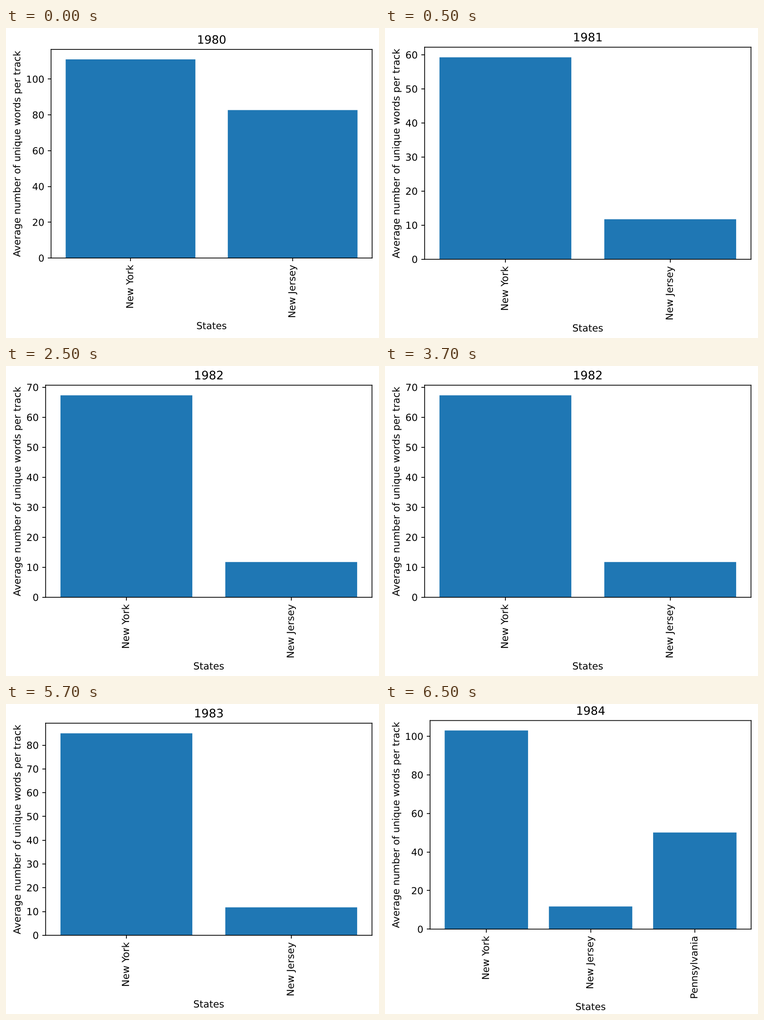
Write a matplotlib script that moves like this. It is 821 by 682 pixels and loops after 8 s.

```python
import matplotlib.pyplot as plt
from matplotlib.animation import FuncAnimation
from matplotlib.patheffects import Normal

WIDTH, HEIGHT, DPI = 821, 682, 100
AXES_INCHES = 4.65, 3.02
PAD_INCHES = 0.1
MEASURE_SCALE = 4
STEP_MS, FRAMES = 500, 16
FIRST_YEAR = 1980

# mean word counts per year; a state without a count is not shown
WORDS = {
    "New York": [111, 59.28, 67.33, 85, 103],
    "New Jersey": [82.67] + [11.75] * 4,
    "Pennsylvania": [0] * 4 + [50.1],
}

fig = plt.figure(figsize=(WIDTH / DPI, HEIGHT / DPI), dpi=DPI, facecolor="white")


def set_style(scale):
    """Scale the default text, line and tick sizes together."""
    plt.rcParams.update({
        "font.family": "DejaVu Sans",
        "font.size": 10 * scale,
        "axes.linewidth": 0.8 * scale,
        "axes.titlepad": 6 * scale,
        "axes.labelpad": 4 * scale,
        "text.hinting": "none",
        "path.snap": False,
        "path.effects": [Normal()],  # outlines keep text at fractional pixels
    })
    for axis in ("xtick", "ytick"):
        plt.rcParams.update({
            f"{axis}.major.size": 3.5 * scale,
            f"{axis}.major.width": 0.8 * scale,
            f"{axis}.major.pad": 3.5 * scale,
        })


def build_chart(index, scale, left=0, bottom=0):
    """Draw one year's bars with the axes corner at the given pixel."""
    set_style(scale)
    fig.clear()
    w, h = (inches * DPI * scale for inches in AXES_INCHES)
    ax = fig.add_axes([left / WIDTH, bottom / HEIGHT, w / WIDTH, h / HEIGHT])
    counts = {state: row[index] for state, row in WORDS.items() if row[index]}
    ax.bar(list(counts), list(counts.values()), color="#1f77b4")
    ax.tick_params(axis="x", rotation=90)
    ax.set_title(str(FIRST_YEAR + index))
    ax.set_xlabel("States")
    ax.set_ylabel("Average number of unique words per track")
    return ax


def draw(step):
    """Fit the padded chart to the stage width and centre it vertically."""
    index = (step + 3) // 4
    ax = build_chart(index, MEASURE_SCALE)
    box = ax.get_tightbbox(fig.canvas.get_renderer())
    unit = MEASURE_SCALE * DPI
    width = (ax.bbox.x1 - box.x0) / unit + 2 * PAD_INCHES
    middle = ((box.y0 + box.y1) / 2 - ax.bbox.y0) / unit
    ppi = WIDTH / width
    left = WIDTH - (PAD_INCHES + AXES_INCHES[0]) * ppi
    build_chart(index, ppi / DPI, left, HEIGHT / 2 - middle * ppi)
    return []


anim = FuncAnimation(fig, draw, frames=FRAMES, interval=STEP_MS,
                     init_func=lambda: draw(0), repeat=True, repeat_delay=0)
plt.show()
```
